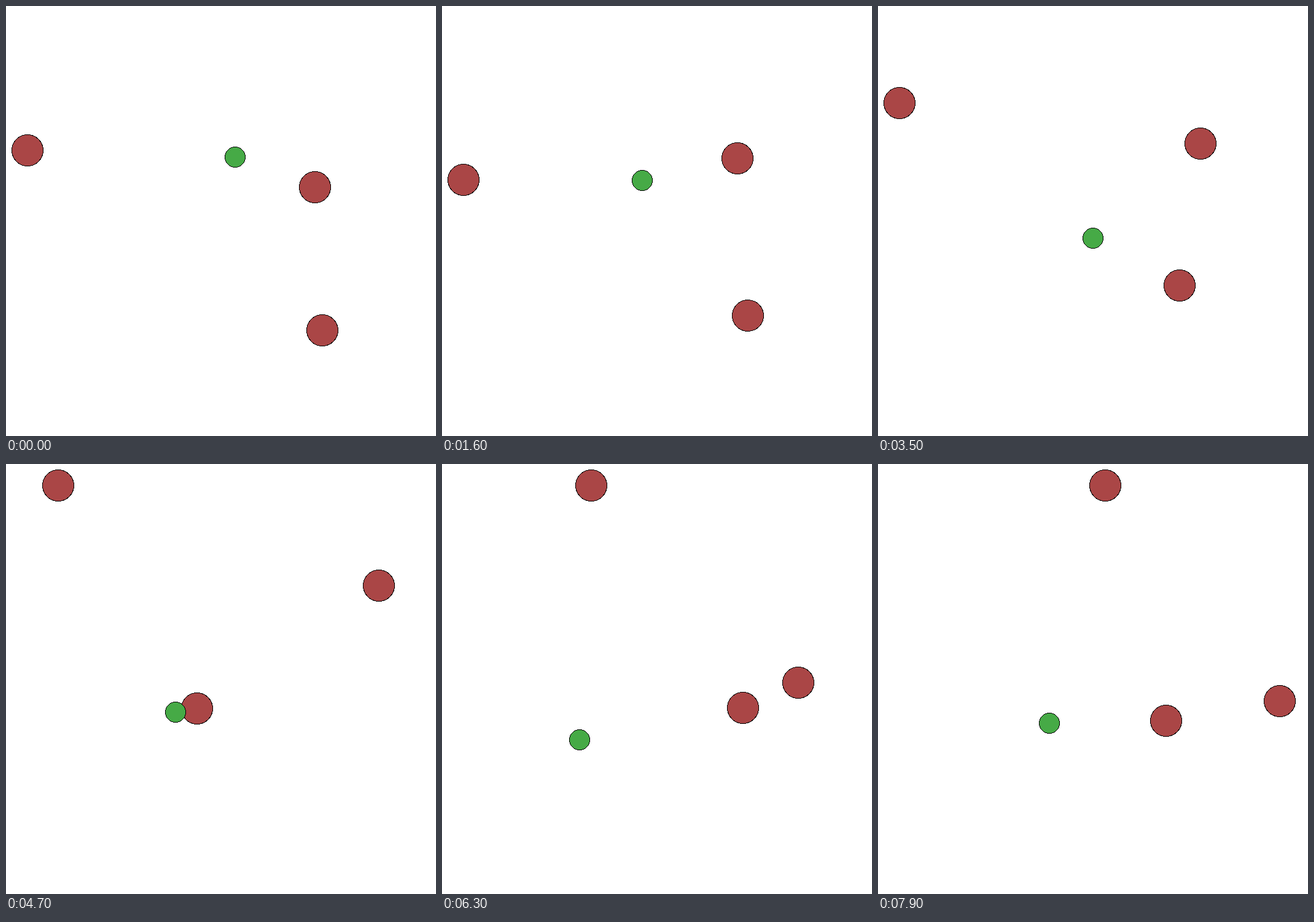
These frames come from a looping animation (700 by 700 pixels, 8 s). An HTML page:

```html
<!DOCTYPE html>
<html>
<head>
<meta charset="utf-8">
<style>
  html, body { margin: 0; height: 100%; overflow: hidden; background: #fff; }
  svg { display: block; }
  circle { stroke: #000; stroke-width: 1; shape-rendering: crispEdges; }
  .hunter { fill: #aa4646; }
  .prey { fill: #46aa46; }
</style>
</head>
<body>
<svg width="700" height="700">
  <circle class="hunter" r="25.5"/>
  <circle class="hunter" r="25.5"/>
  <circle class="hunter" r="25.5"/>
  <circle class="prey" r="16.5"/>
</svg>
<script>
const LOOP = 8000, STEP = 100, WALL = 35;

// Key points of each ball at shared ticks; points past a wall press the ball against it
const ticks = [0, 16, 27, 35, 47, 55, 63, 79];
const paths = [
  [[35, 235], [35, 283], [0, 236], [-100, 158], [85, 20], [181, 0], [243, 0], [370, 0]],
  [[503, 295], [481, 248], [514, 216], [525, 224], [607, 198], [606, 265], [580, 356], [654, 386]],
  [[515, 528], [498, 504], [548, 488], [491, 455], [311, 398], [380, 395], [490, 397], [469, 418]],
  [[373, 246], [326, 284], [325, 376], [350, 378], [276, 404], [176, 482], [224, 449], [279, 422]]
];
const circles = document.querySelectorAll('circle');
const last = ticks.length - 1;

function slope(path, i, axis) {
  const a = Math.max(i - 1, 0), b = Math.min(i + 1, last);
  return (path[b][axis] - path[a][axis]) / (ticks[b] - ticks[a]);
}

// Smooth cubic curve through the key points, kept inside the walls
function position(path, tick, axis) {
  const i = Math.min(ticks.findLastIndex(t => t <= tick), last - 1);
  const span = ticks[i + 1] - ticks[i];
  const u = (tick - ticks[i]) / span, v = 1 - u;
  const value = v * v * (1 + 2 * u) * path[i][axis] + u * u * (1 + 2 * v) * path[i + 1][axis]
    + span * u * v * (v * slope(path, i, axis) - u * slope(path, i + 1, axis));
  return Math.max(WALL, Math.round(value));
}

function draw(time) {
  const tick = Math.floor((time % LOOP) / STEP);
  circles.forEach((circle, i) => {
    circle.setAttribute('cx', position(paths[i], tick, 0));
    circle.setAttribute('cy', position(paths[i], tick, 1));
  });
}

let start;
function frame(now) {
  start ??= now;
  draw(now - start);
  requestAnimationFrame(frame);
}
draw(0);
requestAnimationFrame(frame);
</script>
</body>
</html>
```
